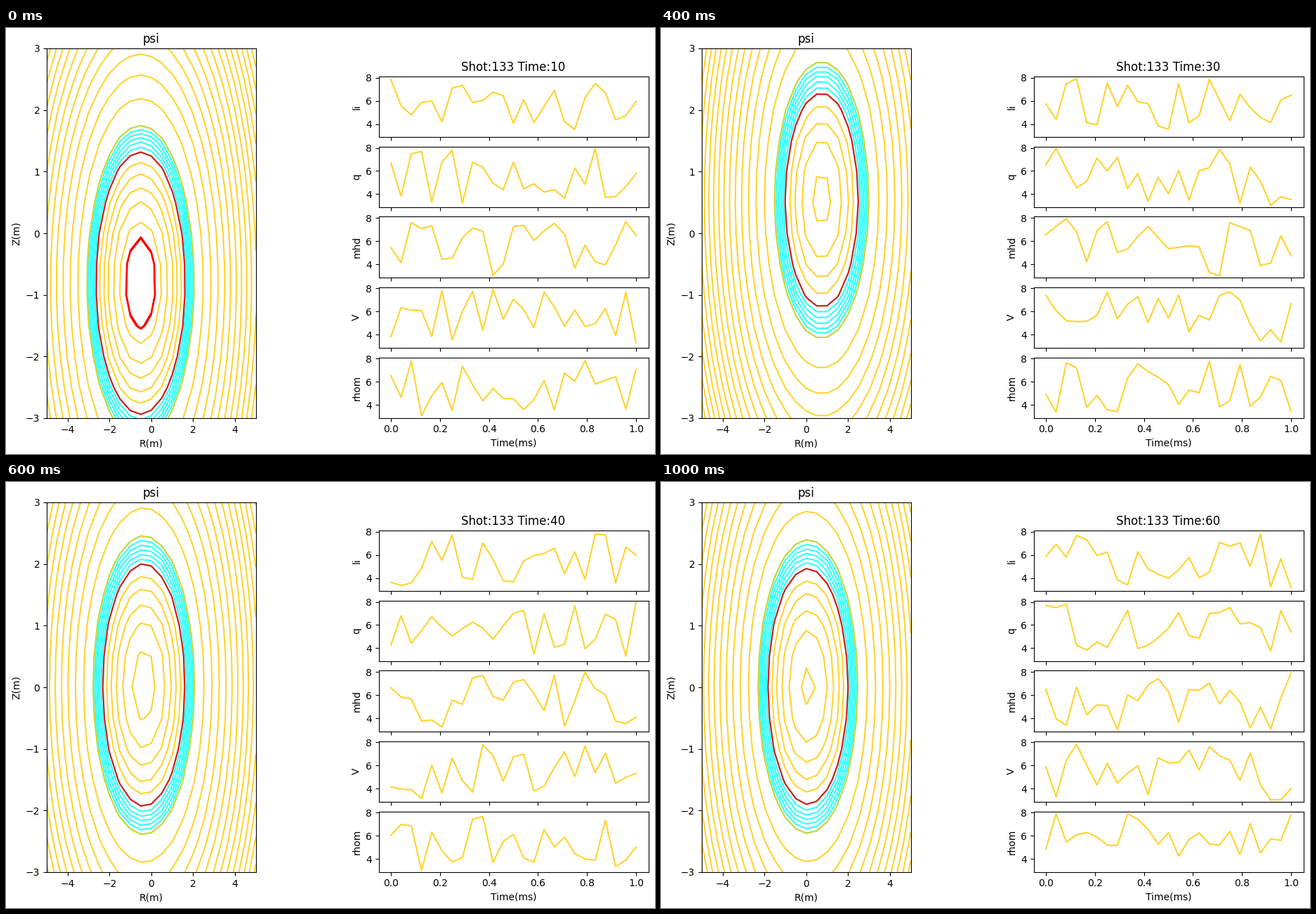
Write a matplotlib script that moves like this. It is 924 by 606 pixels and loops after 1200 ms.

```python
import matplotlib.pyplot as plt
import numpy as np
from matplotlib.animation import FuncAnimation

WIDTH, HEIGHT, DPI = 924, 606, 100
GOLD, CYAN, RED = "#ffca00", "#00ffff", "#ff0000"
ALPHA = 0.82

# Magnetic axis R, Z and boundary flux for each time step
EQUILIBRIA = [
    (-0.51, -0.807, 4.57),
    (0.43, 0.83, 4.40),
    (0.74, 0.54, 3.07),
    (-0.36, 0.033, 3.89),
    (-0.28, 0.122, 3.07),
    (0.08, 0.012, 3.70),
]
INNER_STEP, OUTER_STEP = 0.709, 2.41
EDGE_WIDTH, CORE_DEPTH = 2.02, 4.0

SIGNALS = ["li", "q", "mhd", "V", "rhom"]
PANEL_TOPS = [69, 168.7, 268.5, 368.5, 468.5]
PANEL_HEIGHT = 86

plt.rcParams["font.family"] = "DejaVu Sans"
fig = plt.figure(figsize=(WIDTH / DPI, HEIGHT / DPI), dpi=DPI, facecolor="white")


def pixel_axes(left, top, right, bottom):
    return fig.add_axes([left / WIDTH, 1 - bottom / HEIGHT,
                         (right - left) / WIDTH, (bottom - top) / HEIGHT])


flux_ax = pixel_axes(58, 29, 355.5, 555)
flux_ax.set(title="psi", xlabel="R(m)", ylabel="Z(m)", xlim=(-5, 5), ylim=(-3, 3))
R, Z = np.meshgrid(np.linspace(-5, 5, 21), np.linspace(-3, 3, 13))

time = np.linspace(0, 1, 25)
panels, lines = [], []
for name, top in zip(SIGNALS, PANEL_TOPS):
    ax = pixel_axes(530.5, top, 914.5, top + PANEL_HEIGHT)
    ax.set(ylabel=name, xlim=(-0.05, 1.05), ylim=(2.88, 8.12), yticks=[4, 6, 8])
    ax.tick_params(labelbottom=name == SIGNALS[-1])
    lines += ax.plot(time, np.full_like(time, 5), color=GOLD, alpha=ALPHA)
    panels.append(ax)
panels[-1].set_xlabel("Time(ms)")

contours = []


def draw_levels(psi, levels, color, alpha=ALPHA):
    levels = [v for v in levels if psi.min() < v < psi.max()]
    if levels:
        contours.append(flux_ax.contour(R, Z, psi, levels=levels, colors=[color],
                                        linewidths=1.5, alpha=alpha))


def draw_flux(r_axis, z_axis, boundary):
    while contours:
        contours.pop().remove()
    psi = (R - r_axis) ** 2 + (Z - z_axis) ** 2
    edge = boundary + EDGE_WIDTH
    core = boundary - CORE_DEPTH
    draw_levels(psi, np.linspace(boundary, edge, 7), CYAN)
    draw_levels(psi, boundary - INNER_STEP * np.arange(5, 0, -1), GOLD)
    draw_levels(psi, np.arange(edge, psi.max(), OUTER_STEP), GOLD)
    draw_levels(psi, [core - 0.015, core, core + 0.015], RED, 1)
    draw_levels(psi, [boundary], "#e6140c", 1)


def update(step):
    draw_flux(*EQUILIBRIA[step])
    signals = np.random.default_rng(133 + step).uniform(3, 8, (len(SIGNALS), time.size))
    for line, values in zip(lines, signals):
        line.set_ydata(values)
    panels[0].set_title(f"Shot:133 Time:{10 * (step + 1)}")
    return lines


animation = FuncAnimation(fig, update, frames=len(EQUILIBRIA), init_func=lambda: lines,
                          interval=200, repeat=True, repeat_delay=0, blit=False)
plt.show()
```
